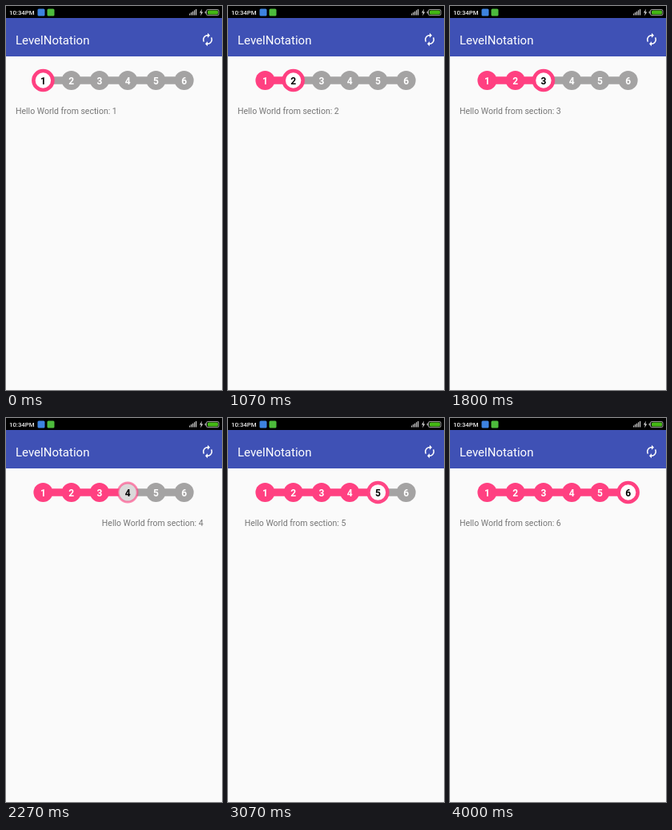
Recreate the animation shown at these times as an HTML page with a canvas. Size 270x480 px, loop 4070 ms.

```html
<!DOCTYPE html>
<html lang="en">
<head>
<meta charset="utf-8">
<title>Step pager</title>
<style>
html, body { margin: 0; width: 100%; height: 100%; overflow: hidden; background: #fafafa; }
canvas { display: block; }
</style>
</head>
<body>
<canvas id="stage" width="270" height="480"></canvas>
<script>
const ctx = document.getElementById('stage').getContext('2d');
const LOOP = 4070, TICK = 1000 / 15, WIDTH = 270;
const PINK = '#ff4081', GRAY = [164, 163, 163], WHITE = [255, 255, 255], GREEN = [50, 255, 50];
const renewIcon = new Path2D('M12 6v3l4-4-4-4v3c-4.42 0-8 3.58-8 8 0 1.57.46 3.03 1.24 4.26L6.7 14.8c-.45-.83-.7-1.79-.7-2.8 0-3.31 2.69-6 6-6zm6.76 1.74L17.3 9.2c.44.84.7 1.79.7 2.8 0 3.31-2.69 6-6 6v-3l-4 4 4 4v-3c4.42 0 8-3.58 8-8 0-1.57-.46-3.03-1.24-4.26z');
const boltIcon = new Path2D('M245 3.5l-3 5h2l-1 4 3.2-5h-2z');

// Each swipe, in ticks: a finger drag up to `reach`, then a decelerating settle.
const swipes = [
  { start: 8, release: 10, end: 16, reach: .215 },
  { start: 16, release: 22, end: 27, reach: .34 },
  { start: 31, release: 33, end: 38, reach: .22 },
  { start: 42, release: 43, end: 48, reach: .5 },
  { start: 53, release: 55, end: 60, reach: .25 }
];

const mix = (a, b, k) => `rgb(${a.map((v, i) => Math.round(v + (b[i] - v) * k))})`;

function swipeProgress(s, tick) {
  if (tick <= s.start) return 0;
  if (tick >= s.end) return 1;
  if (tick <= s.release) return s.reach * ((tick - s.start) / (s.release - s.start)) ** 2;
  return 1 - (1 - s.reach) * ((s.end - tick) / (s.end - s.release)) ** 3;
}

function rect(color, x, y, w, h, radius = 0) {
  ctx.fillStyle = color;
  ctx.beginPath();
  ctx.roundRect(x, y, w, h, radius);
  ctx.fill();
}

function text(str, x, y, font, color, align = 'left') {
  ctx.font = font + ' Roboto, sans-serif';
  ctx.fillStyle = color;
  ctx.textAlign = align;
  ctx.fillText(str, x, y);
}

function drawStatusBar() {
  rect('#000', 0, 0, WIDTH, 15);
  text('10:34PM', 4, 11, '500 7.8px', '#eee');
  rect('#3d83e0', 39.5, 3.5, 9, 9, 1.5);
  rect('#4dbb3c', 51.5, 3.5, 9, 9, 1.5);
  for (let i = 0; i < 5; i++) rect('#ccc', 229 + i * 2, 9.5 - i * 1.4, 1.2, 2 + i * 1.4);
  ctx.fillStyle = '#ddd';
  ctx.fill(boltIcon);
  rect('#999', 248.5, 6.5, 2, 3, 1);
  rect('#999', 250, 4, 16.5, 8, 2.5);
  rect('#000', 251, 5, 14.5, 6, 1.5);
  rect('#44b815', 252, 5.5, 13, 5, 1.5);
}

function drawAppBar() {
  rect('#3f51b5', 0, 15, WIDTH, 48);
  text('LevelNotation', 12, 48, '15px', '#fff');
  ctx.save();
  ctx.translate(243, 33);
  ctx.scale(.75, .75);
  ctx.fillStyle = '#fff';
  ctx.fill(renewIcon);
  ctx.restore();
}

function stepFill(i, current, position, focus) {
  if (i < current) return PINK;
  if (i > current) return mix(GRAY, WHITE, 0);
  return mix(position > i ? GREEN : GRAY, WHITE, focus);
}

function drawSteps(position, current) {
  const gap = 35.25, stepX = i => 46.4 + i * gap, y = 93;
  for (let i = 0; i < 5; i++) {
    rect(i < current ? PINK : mix(GRAY, WHITE, 0), stepX(i), y - 4.7, gap, 9.4);
  }
  for (let i = 0; i < 6; i++) {
    const focus = i < current ? 0 : Math.max(0, 1 - Math.abs(position - i));
    ctx.beginPath();
    ctx.arc(stepX(i), y, 12, 0, 2 * Math.PI);
    ctx.fillStyle = stepFill(i, current, position, focus);
    ctx.fill();
    if (focus > 0) {
      ctx.globalAlpha = focus;
      ctx.strokeStyle = PINK;
      ctx.lineWidth = 4.6 * focus;
      ctx.stroke();
      ctx.globalAlpha = 1;
    }
    text(i + 1, stepX(i), y + 4.5, 'bold 12px', i === current ? '#000' : '#fff', 'center');
  }
}

function draw(ms) {
  const tick = Math.floor((ms % LOOP + 5) / TICK);
  const position = swipes.reduce((sum, s) => sum + swipeProgress(s, tick), 0);
  const current = swipes.filter(s => tick > s.release).length;
  rect('#fafafa', 0, 0, WIDTH, 480);
  drawStatusBar();
  drawAppBar();
  drawSteps(position, current);
  for (let i = 0; i < 6; i++) {
    const x = 12 + (i - position) * WIDTH;
    if (Math.abs(x) < WIDTH) text('Hello World from section: ' + (i + 1), x, 134.5, '10.5px', '#757575');
  }
}

const began = performance.now();
function frame() {
  draw(performance.now() - began);
  requestAnimationFrame(frame);
}
frame();
</script>
</body>
</html>
```
